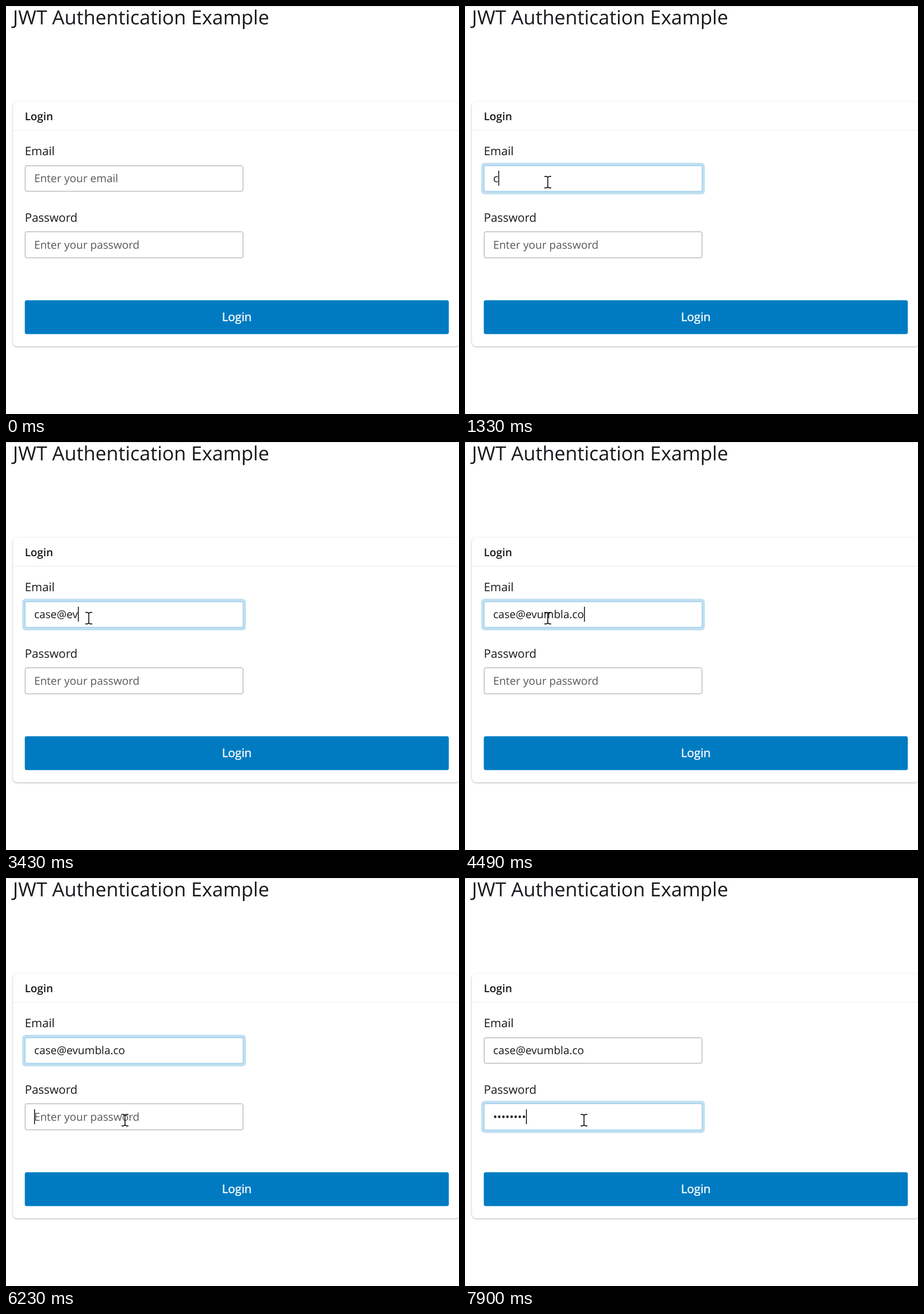
An HTML page for the animation above (8000 ms loop, 788 by 711 pixels).

```html
<!DOCTYPE html>
<html lang="en">
<head>
<meta charset="utf-8">
<title>Login form</title>
<style>
  html, body { margin: 0; width: 100%; height: 100%; overflow: hidden; background: #fff; }
  svg { display: block; }
  text {
    font: 19px "Open Sans", "Noto Sans", sans-serif;
    fill: #17171c;
    text-rendering: geometricPrecision;
  }
  .title { font-size: 34px; }
  .label { font-size: 20.4px; }
  .head { font-size: 18.8px; font-weight: 600; }
  .btn { font-size: 20.4px; fill: #fff; stroke: #fff; stroke-width: .4; text-anchor: middle; }
  .hint { fill: #58585a; }
  .card {
    fill: #fff;
    filter: drop-shadow(0 1px 1px rgba(0, 0, 0, .16)) drop-shadow(0 1px 2px rgba(0, 0, 0, .14));
  }
  .ring { fill: #bfdff1; }
  .box { fill: #fff; stroke-width: 1; }
  .caret { fill: #000; }
</style>
</head>
<body>
<svg width="788" height="711" viewBox="0 0 788 711">
  <rect width="788" height="1" fill="#dedee0"/>
  <text class="title" x="12.1" y="32">JWT Authentication Example</text>

  <rect class="card" x="12" y="167" width="778" height="426" rx="8"/>
  <rect x="12" y="216" width="778" height="1" fill="#ebebed"/>
  <text class="head" x="32.7" y="199">Login</text>

  <text class="label" x="32.7" y="260">Email</text>
  <g id="email"></g>
  <text class="label" x="32.7" y="376">Password</text>
  <g id="password"></g>

  <rect id="button" x="32.7" y="512.7" width="737.6" height="59" rx="3.5"/>
  <text class="btn" x="401.5" y="549">Login</text>

  <path id="arrow" d="M.5 .5V20L5 15.8L8.3 23L11.6 21.6L8.4 14.6H14Z"
        fill="#fff" stroke="#2a2a2e" stroke-width="1"/>
  <path id="beam" d="M-6 -10H-2.5L0 -8.8L2.5 -10H6M0 -9V9M-6 10H-2.5L0 8.8L2.5 10H6"
        fill="none" stroke="#000" stroke-width="1.5"/>
</svg>
<script>
const LOOP = 8000;
const TICK = 70;
const EMAIL = "case@evumbla.com";
const TEXT_X = 48.9;
const FOCUS_EMAIL = 790;
const FOCUS_PASSWORD = 6230;

const clamp = (v, lo, hi) => Math.min(hi, Math.max(lo, v));
const mix = (a, b, k) => `rgb(${a.map((v, i) => Math.round(v + (b[i] - v) * k))})`;
const byId = id => document.getElementById(id);

// keys pressed so far in an even burst
const typed = (t, start, step, count) => clamp(Math.floor((t - start) / step) + 1, 0, count);

// the focus ring fades in over two ticks after a click
const focusAt = (t, start) => clamp(Math.floor((t - start) / TICK) / 2, 0, 1);

function emailLength(t) {
  const retyping = t >= 3100 && t < 3160;
  const erased = t >= 5150;
  return typed(t, 1330, 153, 4) + typed(t, 2320, 480, 2) + typed(t, 3430, 132, 10)
    - retyping - erased;
}

// eased glide along a quadratic curve, seen once per tick
function glide(t, start, steps, from, bend, to) {
  const u = clamp(Math.floor((t - start) / TICK) / steps, 0, 1);
  const k = 1 - (1 - u) ** 2;
  return from.map((v, i) => (1 - k) ** 2 * v + 2 * k * (1 - k) * bend[i] + k * k * to[i]);
}

function pointerAt(t) {
  const rest = [144, 307];
  return t < 5610
    ? glide(t, 180, 7, [450, 567], [330, 330], rest)
    : glide(t, 5610, 6, rest, [151, 393], [207, 422]);
}

function add(parent, tag, attrs) {
  const el = document.createElementNS("http://www.w3.org/2000/svg", tag);
  for (const name in attrs) el.setAttribute(name, attrs[name]);
  return parent.appendChild(el);
}

function makeField(id, top, height, caretTop, hintText) {
  const group = byId(id);
  const ring = add(group, "rect", {
    class: "ring", x: 28.2, y: top - 4.8, width: 389, height: height + 10, rx: 6
  });
  const box = add(group, "rect", {
    class: "box", x: 33.3, y: top + 0.4, width: 379, height: height - 0.5, rx: 3
  });
  const hint = add(group, "text", { class: "hint", x: TEXT_X, y: caretTop + 20 });
  const value = add(group, "text", { x: TEXT_X, y: caretTop + 20 });
  const caret = add(group, "rect", { class: "caret", y: caretTop, width: 1.4, height: 26 });
  hint.textContent = hintText;

  return (text, focus, active) => {
    ring.setAttribute("opacity", focus);
    box.setAttribute("stroke", mix([155, 160, 170], [140, 199, 232], focus));
    hint.setAttribute("visibility", text ? "hidden" : "visible");
    value.textContent = text;
    const width = text ? value.getComputedTextLength() : 0;
    caret.setAttribute("x", TEXT_X + width);
    caret.setAttribute("visibility", active ? "visible" : "hidden");
  };
}

const drawEmail = makeField("email", 278, 45, 287, "Enter your email");
const drawPassword = makeField("password", 393, 46, 403, "Enter your password");

function drawPointer(t) {
  const [x, y] = pointerAt(t);
  const shown = t >= 180;
  const within = (left, right, top, bottom) => x > left && x < right && y > top && y < bottom;
  const overField = within(33, 413, 278, 323) || within(33, 413, 393, 439);
  const overButton = shown && within(33, 770, 513, 572);
  for (const [id, on] of [["beam", overField], ["arrow", !overField]]) {
    byId(id).setAttribute("transform", `translate(${x} ${y})`);
    byId(id).setAttribute("visibility", shown && on ? "visible" : "hidden");
  }
  byId("button").setAttribute("fill", overButton ? "#006fb0" : "#007bc2");
}

function draw(t) {
  const moved = focusAt(t, FOCUS_PASSWORD);
  const inEmail = t >= FOCUS_EMAIL && t < FOCUS_PASSWORD;
  drawEmail(EMAIL.slice(0, emailLength(t)), focusAt(t, FOCUS_EMAIL) - moved, inEmail);
  drawPassword("•".repeat(typed(t, 6700, 171, 8)), moved, t >= FOCUS_PASSWORD);
  drawPointer(t);
}

const start = performance.now();
function tick() {
  draw((performance.now() - start) % LOOP);
  requestAnimationFrame(tick);
}
tick();
</script>
</body>
</html>
```
